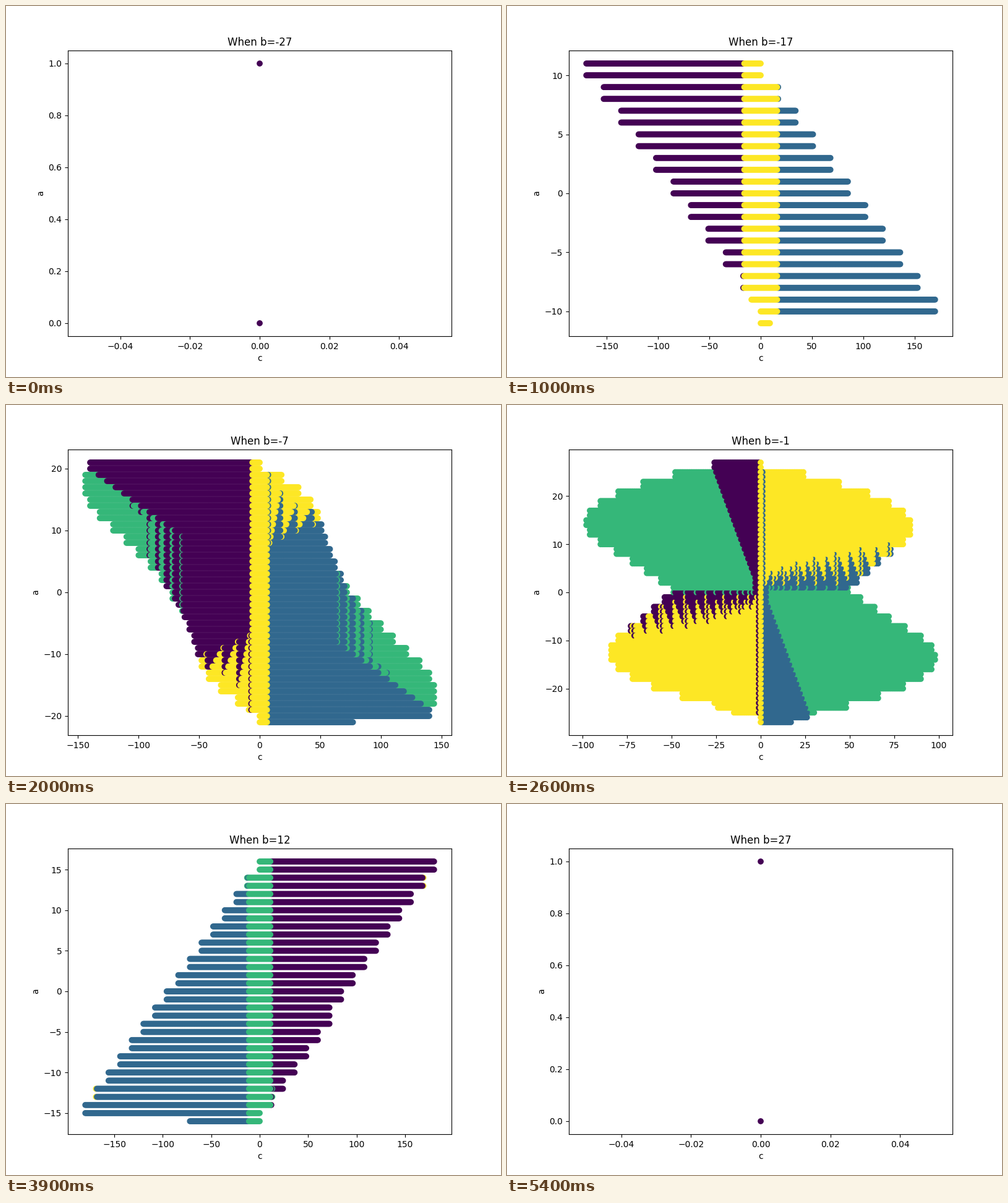
A matplotlib script for the animation above (5.5 s loop, 800 by 600 pixels).

```python
import matplotlib.pyplot as plt
import numpy as np
from matplotlib.animation import FuncAnimation

# Discrete Heisenberg group: generators x, x^-1, y, y^-1 acting on the right.
STEPS = [(1, 0), (-1, 0), (0, 1), (0, -1)]
ORIGIN = (0, 0, 0)
LAST = (-11, -17, 9)  # the search stops once this element is reached
B_MAX = 27


def grow():
    """Breadth-first search; each element keeps the first letter of its word."""
    letter = {ORIGIN: 0}
    sphere = [ORIGIN]
    while sphere:
        shell = []
        for k, (da, db) in enumerate(STEPS):
            for p in sphere:
                a, b, c = p
                q = (a + da, b + db, c + db * a)
                if q in letter:
                    continue
                letter[q] = k if p == ORIGIN else letter[p]
                shell.append(q)
                if q == LAST:
                    return letter
        sphere = shell
    return letter


def slices(letter):
    """Group by b, newest elements first so that older ones lie on top."""
    rows = {b: [] for b in range(-B_MAX, B_MAX + 1)}
    for (a, b, c), k in reversed(letter.items()):
        if b in rows:
            rows[b].append((c, a, k))
    return {b: np.array(r) for b, r in rows.items()}


layers = slices(grow())
fig, ax = plt.subplots(figsize=(8, 6), dpi=100)


def draw(i):
    b = i - B_MAX
    c, a, k = layers[b].T
    ax.clear()
    ax.scatter(c, a, c=k)
    ax.set_title(f"When b={b}")
    ax.set_xlabel("c")
    ax.set_ylabel("a")
    return []


anim = FuncAnimation(fig, draw, frames=2 * B_MAX + 1, interval=100,
                     init_func=lambda: [], repeat=True, repeat_delay=0)
plt.show()
```
